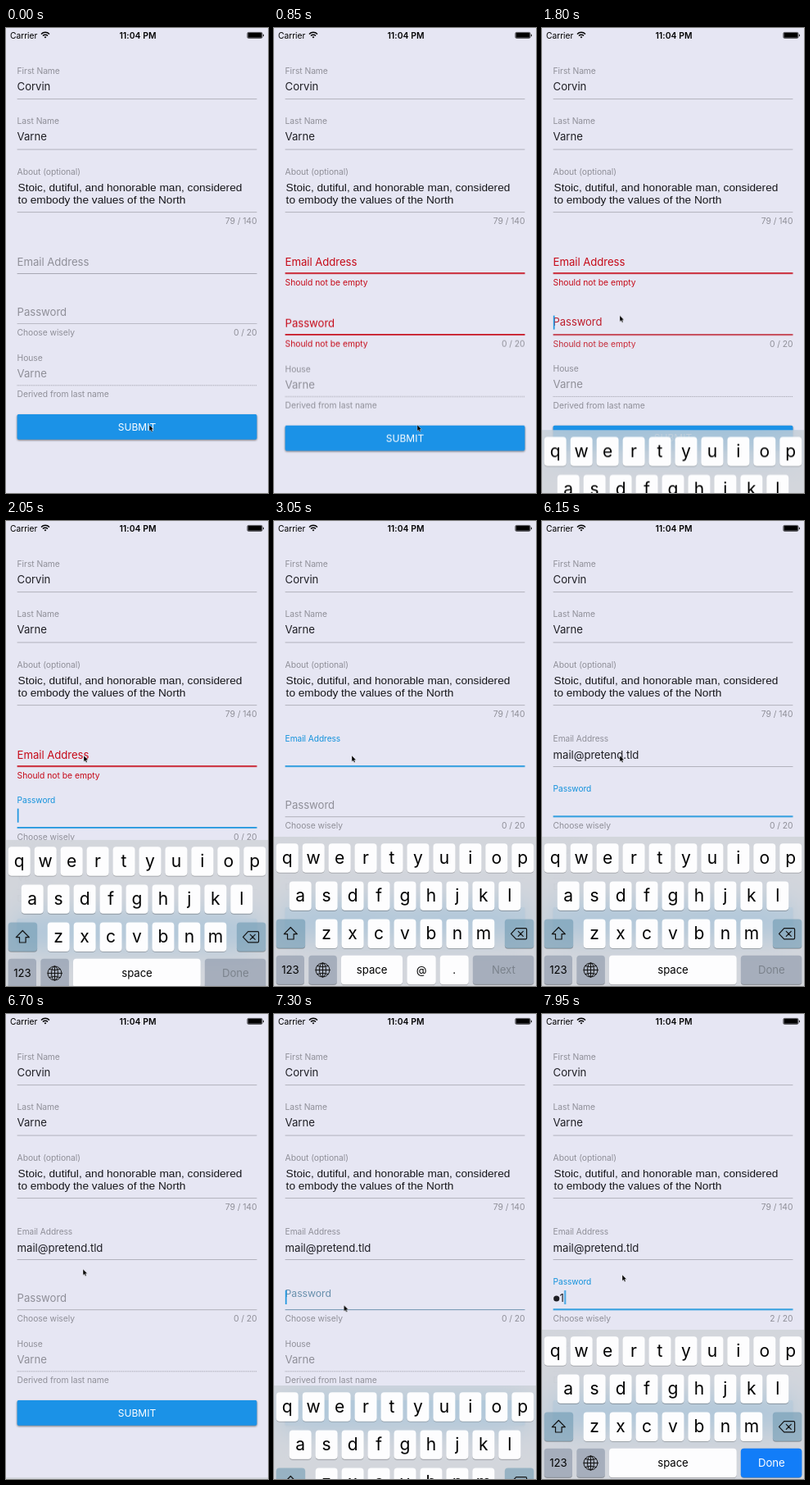
An HTML page that plays this animation: 320x567 px, repeating every 8000 ms.

```html
<!DOCTYPE html>
<html lang="en">
<head>
<meta charset="utf-8">
<title>Sign-up form</title>
<style>
  html, body { margin: 0; width: 100%; height: 100%; overflow: hidden; background: #e6e6f3; }
  svg { display: block; }
  .layer { position: absolute; left: 0; top: 0; }
  text { font: 13.2px Inter, Roboto, sans-serif; letter-spacing: -.005em; white-space: pre; }
  .value { fill: #1f1f25; }
  .small { font-size: 10.3px; }
  .base { fill: #8f8f98; }
  .error { fill: #c60a18; letter-spacing: 0; }
  .area { font: 13.65px "Liberation Sans", Arial, sans-serif; letter-spacing: 0; fill: #16161a; }
  .end { text-anchor: end; }
  .mid { text-anchor: middle; }
  .caret { fill: #1c95e0; }
  #submit { filter: drop-shadow(0 1px 1.2px rgba(0, 0, 0, .5)); }
  #keyboard {
    position: absolute; left: 0; top: 385px; width: 320px; height: 182px; overflow: hidden;
    background: rgba(205, 209, 213, .75);
    backdrop-filter: blur(19px);
  }
  .key { fill: #fdfdfe; }
  .dark { fill: #7d8a9e; fill-opacity: .52; }
  .tinted { fill: #6c98b2; fill-opacity: .58; }
  .shade { fill: #000; fill-opacity: .3; }
  .letter { font-size: 21px; letter-spacing: 0; }
  .icon { fill: none; stroke: #111; stroke-width: 1.2; stroke-linejoin: round; stroke-linecap: round; }
  .off { fill: #7b828c; }
</style>
</head>
<body>
<svg class="layer" width="320" height="567" viewBox="0 0 320 567">
  <text class="small" x="5" y="12.6">Carrier</text>
  <g fill="none" stroke="#000" stroke-width="1.5">
    <path d="M43 7.4a7 7 0 0 1 10 0M45 9.5a4.2 4.2 0 0 1 6 0"/>
    <path d="M46.6 10.9L48 12.4l1.4-1.5a2 2 0 0 0-2.8 0z" fill="#000" stroke="none"/>
  </g>
  <text class="small mid" x="161" y="12.6" style="font-weight:600;letter-spacing:.01em">11:04 PM</text>
  <rect x="294.9" y="5.4" width="18" height="7" rx="1.3" fill="none" stroke="#000" stroke-width=".7"/>
  <rect x="295.5" y="6" width="16.8" height="5.8" rx=".6"/>
  <path d="M313.9 7.4a1.6 1.6 0 0 1 0 3z"/>

  <g id="fixed">
    <text class="small base" x="13.6" y="56">First Name</text>
    <text class="value" x="13.6" y="76">Corvin</text>
    <text class="small base" x="13.6" y="117.3">Last Name</text>
    <text class="value" x="13.6" y="137.4">Varne</text>
    <text class="small base" x="13.6" y="178.8">About (optional)</text>
    <text class="area" x="14.6" y="198.5">Stoic, dutiful, and honorable man, considered</text>
    <text class="area" x="14.6" y="214.3">to embody the values of the North</text>
    <text class="small base end" x="306.4" y="238.7">79 / 140</text>
    <path d="M13.6 86.6h292.8M13.6 148.1h292.8M13.6 224.6h292.8" stroke="#8f8f98" stroke-width=".6"/>
  </g>

  <g id="mail">
    <text class="label base">Email Address</text>
    <text class="value" id="address" x="13.6" y="289.5"></text>
    <rect class="caret" x="0" y="276" width="1.7" height="17"/>
    <rect class="line base" x="0" y="-1" width="292.8" height="1"/>
    <text class="small error" x="13.6" y="313.7">Should not be empty</text>
  </g>

  <g id="shift">
    <g id="pass">
      <text class="label base">Password</text>
      <text class="value" id="first" x="13.6" y="351">1</text>
      <g id="second" class="value">
        <circle cx="17.7" cy="347" r="3.6"/>
        <text x="21.6" y="351">1</text>
      </g>
      <rect class="caret" x="13.8" y="337" width="1.7" height="17"/>
      <rect class="line base" x="0" y="-1" width="292.8" height="1"/>
      <text class="small error" x="13.6" y="375">Should not be empty</text>
      <text class="small base helper" x="13.6" y="375">Choose wisely</text>
      <text class="small base end" id="count0" x="306.4" y="375">0 / 20</text>
      <text class="small base end" id="count1" x="306.4" y="375">1 / 20</text>
      <text class="small base end" id="count2" x="306.4" y="375">2 / 20</text>
    </g>
    <text class="small base" x="13.6" y="405.7">House</text>
    <text class="base" x="13.6" y="425.7">Varne</text>
    <path d="M13.6 435.8h292.8" stroke="#8f8f98" stroke-width=".8" stroke-dasharray=".9 .9"/>
    <text class="small base" x="13.6" y="450">Derived from last name</text>
    <g id="submit">
      <rect x="13.6" y="471" width="292.8" height="30.7" rx="1.8" fill="#1b92e7"/>
    </g>
    <text class="mid" x="160" y="490.6" fill="#fff" style="font-size:12px;letter-spacing:0">SUBMIT</text>
  </g>
</svg>

<div id="keyboard">
  <svg width="320" height="182" viewBox="0 385 320 182">
    <g id="keys"></g>
    <path class="icon" d="M20.3 495.5l8 8.2h-4.2v6.3h-7.6v-6.3h-4.2z"/>
    <path class="icon" d="M289.5 503.3l6.2-6.6h11.6q1.3 0 1.3 1.3v10.6q0 1.3-1.3 1.3h-11.6zM298.3 500.3l6 6m0-6l-6 6"/>
    <g class="icon" style="stroke-width:1">
      <circle cx="59.5" cy="547.5" r="8.5"/>
      <ellipse cx="59.5" cy="547.5" rx="4" ry="8.5"/>
      <path d="M59.5 539v17M51 547.5h17M52.8 542.5q6.7 2.6 13.4 0M52.8 552.5q6.7-2.6 13.4 0"/>
    </g>
    <text class="mid" x="20" y="552.2">123</text>
    <g id="plainRow"></g>
    <g id="mailRow"></g>
  </svg>
</div>

<svg class="layer" width="320" height="567" viewBox="0 0 320 567">
  <path id="pointer" d="M0 0V7.4L1.7 5.9 2.9 8.6 4.2 8 3 5.4H5.3Z" fill="#000" stroke="#fff" stroke-opacity=".7" stroke-width=".5"/>
</svg>

<script>
const LOOP = 8000, FADE = 225;
const $ = s => typeof s === 'string' ? document.querySelector(s) : s;
const sheet = document.head.appendChild(document.createElement('style'));
let tracks = 0;

// frames: [time, value, easing]
function track(target, prop, frames) {
  const name = 'k' + tracks++;
  const all = [...frames, [LOOP, frames[frames.length - 1][1]]];
  const body = all.map(([t, v, ease = 'linear']) =>
    `${t / LOOP * 100}%{${prop}:${v};animation-timing-function:${ease}}`).join('');
  sheet.append(`@keyframes ${name}{${body}}\n`);
  const style = $(target).style;
  style.animation = [style.animation, `${name} ${LOOP}ms linear infinite`].filter(Boolean).join(', ');
}

const step = (target, prop, list) => track(target, prop, list.map(([t, v]) => [t, v, 'step-end']));

// Starts at the given opacity and flips at each time
const flip = (target, start, ...times) =>
  step(target, 'opacity', [0, ...times].map((t, i) => [t, (start + i) % 2]));

// States: -1 error, 0 idle, 1 focused
function states(target, prop, values, seq) {
  const frames = [[0, values[seq[0][1]]]];
  for (let i = 1; i < seq.length; i++) {
    const [t, now] = seq[i], was = seq[i - 1][1], across = was * now < 0;
    frames.push([t, values[was], across ? 'ease-in' : 'ease-in-out']);
    if (across) frames.push([t + FADE / 2, values[0], 'ease-out']);
    frames.push([t + FADE, values[now]]);
  }
  track(target, prop, frames);
}

const TAP = { submit: 200, pass: 1765, mail: 2150, next: 5230, away: 6400, again: 7215 };
const mailSeq = [[0, 0], [TAP.submit, -1], [TAP.mail, 1], [TAP.next, 0]];
const passTail = [[TAP.pass, 1], [TAP.mail, 0], [TAP.next, 1], [TAP.away, 0], [TAP.again, 1]];
const passSeq = [[0, 0], [TAP.submit, -1], ...passTail];
const tint = { '-1': '#c60a18', 0: '#8f8f98', 1: '#1392dc' };

function field(id, bottom, seq, labelSeq) {
  const label = up => `translate(13.6px,${bottom - (up ? 30.8 : 10.2)}px) scale(${up ? .77 : 1})`;
  const line = h => `translate(13.6px,${bottom}px) scaleY(${h})`;
  states(id + ' .label', 'fill', tint, seq);
  states(id + ' .label', 'transform', { 0: label(0), 1: label(1) }, labelSeq);
  states(id + ' .line', 'fill', tint, seq);
  states(id + ' .line', 'transform', { '-1': line(1.7), 0: line(.6), 1: line(1.7) }, seq);
  states(id + ' .error', 'opacity', { '-1': 1, 0: 0, 1: 0 }, seq);
}
field('#mail', 299.9, mailSeq, [[0, 0], [TAP.mail, 1]]);
field('#pass', 361.1, passSeq, [[0, 0], ...passTail]);
states('#pass .helper', 'opacity', { '-1': 0, 0: 1, 1: 1 }, passSeq);
states('#shift', 'transform',
  { '-1': 'translateY(13.65px)', 0: 'translateY(0px)', 1: 'translateY(0px)' }, mailSeq);

// Typing the address
const address = $('#address'), typeStart = 3400, typeStep = 112;
for (const ch of 'mail@pretend.tld') {
  const span = document.createElementNS('http://www.w3.org/2000/svg', 'tspan');
  span.textContent = ch;
  address.append(span);
}
const stops = [[0, 'translateX(13.8px)']];
[...address.children].forEach((span, i) => {
  const t = typeStart + i * typeStep;
  step(span, 'fill-opacity', [[0, 0], [t, 1]]);
  stops.push([t, `translateX(${address.getEndPositionOfChar(i).x + .3}px)`]);
});
step('#mail .caret', 'transform', stops);
flip('#mail .caret', 0, TAP.mail, 2700, 3150, TAP.next);

// Typing the password
const one = 7720, two = 7900;
flip('#first', 0, one, two);
flip('#second', 0, two);
flip('#count0', 1, one);
flip('#count1', 0, one, two);
flip('#count2', 0, two);
step('#pass .caret', 'transform',
  [[0, 'translateX(0px)'], [one, 'translateX(6px)'], [two, 'translateX(13.5px)']]);
flip('#pass .caret', 0, TAP.pass, TAP.mail, TAP.next, 5780, 6230, TAP.away, TAP.again);

// Keyboard
const cap = (x, y, w, kind = 'key', id = '') =>
  `<path class="shade" d="M${x} ${y + 31}v1.3q0 4 4 4h${w - 8}q4 0 4-4v-1.3q0 4-4 4h${8 - w}q-4 0-4-4z"/>
   <rect id="${id}" class="${kind}" x="${x}" y="${y}" width="${w}" height="35.4" rx="4"/>`;
const word = (s, x, kind = '', id = '') =>
  `<text id="${id}" class="mid ${kind}" x="${x}" y="552.2">${s}</text>`;

$('#keys').innerHTML = ['qwertyuiop', 'asdfghjkl', 'zxcvbnm'].map((row, r) =>
  [...row].map((ch, i) => {
    const x = 160 + (i - (row.length - 1) / 2) * 31.95, y = 393.3 + r * 46.1;
    return cap(x - 13.4, y, 26.8) +
      `<text class="letter mid" x="${x}" y="${y + 24.2}">${ch}</text>`;
  }).join('')).join('') +
  cap(2.6, 485.5, 35.6, 'tinted') + cap(281.8, 485.5, 35.6, 'tinted') +
  cap(2.6, 529.8, 34.4, 'dark') + cap(42.3, 529.8, 34.6, 'dark');

$('#plainRow').innerHTML = cap(82, 529.8, 155.6) + word('space', 160) +
  cap(242.8, 529.8, 74.6, 'dark') +
  `<rect id="ready" x="242.8" y="529.8" width="74.6" height="35.4" rx="4" fill="#127df8"/>` +
  word('Done', 280.3, 'off', 'done');

$('#mailRow').innerHTML = cap(82, 529.8, 75) + word('space', 119.6) +
  cap(162.6, 529.8, 35) + word('@', 180.2) + cap(202.8, 529.8, 34.8) + word('.', 220.2) +
  cap(242.8, 529.8, 74.6, 'dark') + word('Next', 280.3, '', 'next');

flip('#mailRow', 0, TAP.mail + 20, TAP.next);
flip('#plainRow', 1, TAP.mail + 20, TAP.next);
step('#next', 'fill', [[0, '#7b828c'], [typeStart, '#111']]);
step('#done', 'fill', [[0, '#7b828c'], [one, '#fff']]);
flip('#ready', 0, one);

const spring = 'cubic-bezier(.17,.6,.2,1)', rise = 420;
const up = 'translateY(0px)', down = 'translateY(184px)';
track('#keyboard', 'transform', [
  [0, down], [1750, down, spring], [1750 + rise, up],
  [TAP.away, up, spring], [TAP.away + rise, down],
  [TAP.again, down, spring], [TAP.again + rise, up]
]);

// Pointer
track('#pointer', 'transform', [
  [0, 175, 484], [1100, 175, 484], [1620, 95, 352], [1780, 95, 352], [1980, 95, 286],
  [6180, 95, 286], [6340, 95, 306], [6600, 95, 306], [7050, 85.4, 355], [7320, 85.4, 355], [7620, 98, 318]
].map(([t, x, y]) => [t, `translate(${x}px,${y}px)`, 'ease-in-out']));
</script>
</body>
</html>
```
